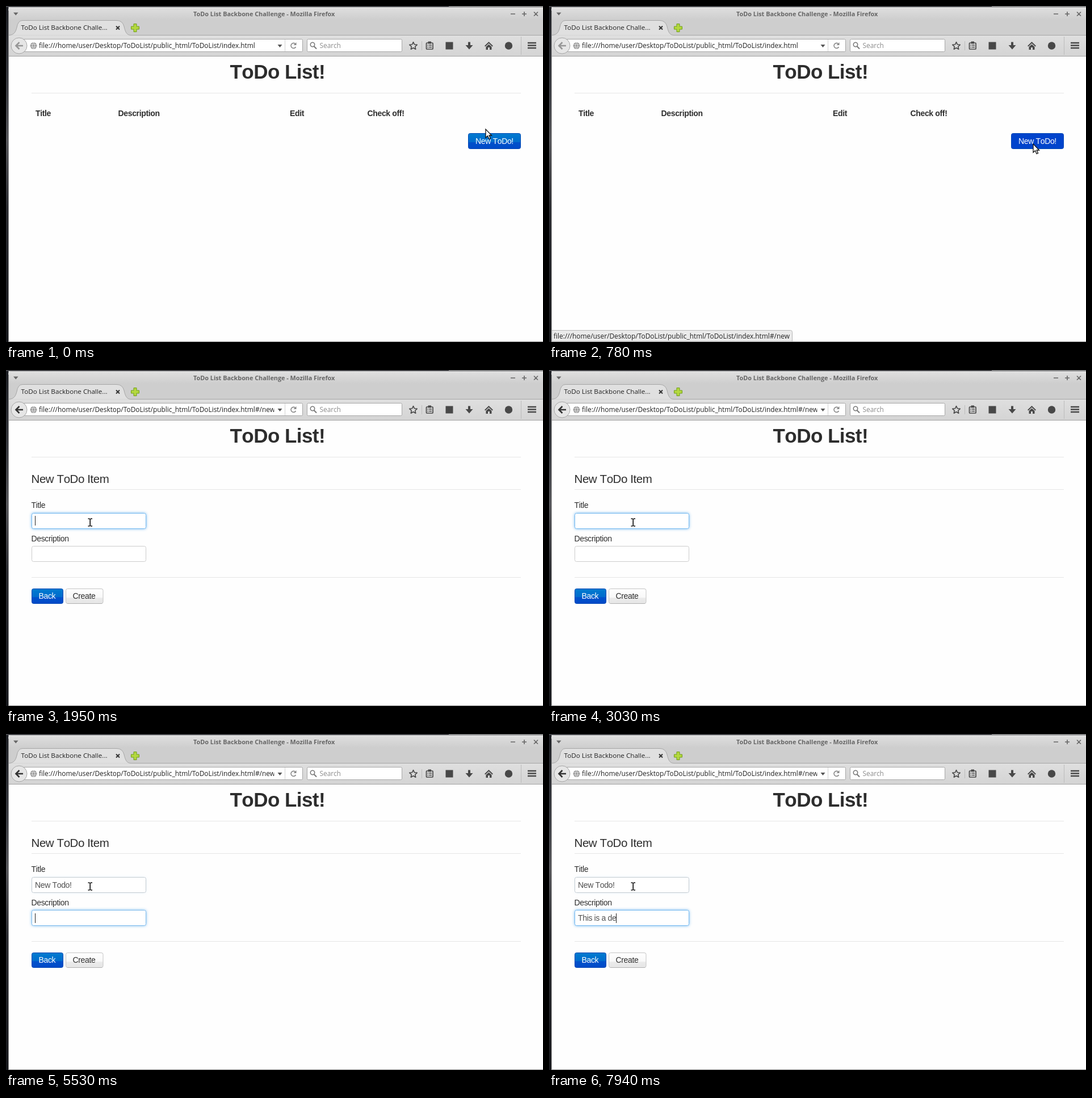
An HTML page for the animation above (8 s loop, 946x592 px).

```html
<!DOCTYPE html>
<html lang="en">
<head>
<meta charset="utf-8">
<title>ToDo List</title>
<style>
html, body { margin: 0; width: 100%; height: 100%; overflow: hidden; background: #fefefe; }
svg { display: block; }
text { font: 14px "Liberation Sans", Arial, sans-serif; letter-spacing: -.35px; font-kerning: none; white-space: pre; fill: #2d2d2d; }
.ui { font: 11.9px "Open Sans", "Noto Sans", sans-serif; letter-spacing: 0; fill: #222; }
.bold { font-weight: bold; }
.entry { fill: #505050; }
.white { fill: #fff; }
.rule { stroke: #e6e6e6; }
.icon { fill: none; stroke: #484848; stroke-width: 2; }
.solid { fill: #484848; }
.box { fill: #fff; stroke: #a6a6a6; }
.primary { fill: url(#blue); stroke: #0047b4; }
</style>
</head>
<body>
<svg width="946" height="592" viewBox="0 0 946 592">
  <defs>
    <linearGradient id="bar" x2="0" y2="1"><stop stop-color="#dfdfdf"/><stop offset="1" stop-color="#cecece"/></linearGradient>
    <linearGradient id="tools" x2="0" y2="1"><stop stop-color="#dfdfdf"/><stop offset="1" stop-color="#d4d4d4"/></linearGradient>
    <linearGradient id="blue" x2="0" y2="1">
      <stop stop-color="#007bcf"/><stop offset=".56" stop-color="#006ccd"/>
      <stop offset=".58" stop-color="#0052cb"/><stop offset="1" stop-color="#0049c8"/>
    </linearGradient>
    <linearGradient id="pale" x2="0" y2="1">
      <stop stop-color="#fff"/><stop offset=".6" stop-color="#f8f8f8"/>
      <stop offset=".62" stop-color="#ebebeb"/><stop offset="1" stop-color="#e6e6e6"/>
    </linearGradient>
    <linearGradient id="desk" x2="0" y2="1">
      <stop stop-color="#1b1d22"/><stop offset=".25" stop-color="#3a3c42"/><stop offset=".4" stop-color="#56565a"/>
      <stop offset=".6" stop-color="#2b2c31"/><stop offset="1" stop-color="#17181c"/>
    </linearGradient>
    <clipPath id="urlClip"><path d="M56 58H472.500V82H56z"/></clipPath>
  </defs>

  <!-- window frame -->
  <path d="M0 0H4.500V592H0z" fill="url(#desk)"/>
  <path d="M0 0H946V2H0z" fill="#45464a"/>
  <path d="M780 0H946V1H780z" fill="#b5b5b5"/>
  <path d="M4 8Q4 2 10 2H946V24H4z" fill="url(#bar)"/>
  <path d="M4 24H946V52H4z" fill="#cecece"/>
  <path d="M4 52H946V88H4z" fill="url(#tools)"/>
  <path d="M4 88.500H946" stroke="#a3a3a3"/>
  <path d="M4.500 8V592M4 591.500H946" stroke="#8b8b8b" fill="none"/>
  <path d="M13 11.500H21.500L17.250 16.500z" fill="#666"/>
  <path d="M889 14H897M909 14H917M913 10V18M930 10.500L937 17.500M937 10.500L930 17.500" stroke="#666" stroke-width="1.600"/>
  <text class="ui" x="330" y="18" style="font-weight:bold;font-size:10.85px;fill:#666">ToDo List Backbone Challenge - Mozilla Firefox</text>

  <!-- tab -->
  <path d="M5 51.500C14 51 17 46 19 38Q21 25.500 29 25.500H195Q205 25.500 208 36C210 46 213 51.500 220 51.500" fill="#e0e0e0"/>
  <path d="M5 51.500C14 51 17 46 19 38Q21 25.500 29 25.500H195Q205 25.500 208 36C210 46 213 51.500 220 51.500H946" fill="none" stroke="#a6a6a6"/>
  <text class="ui" x="26.500" y="42" style="font-size:11.65px">ToDo List Backbone Challe...</text>
  <path d="M194 35.500L200 41.500M200 35.500L194 41.500" stroke="#333" stroke-width="2"/>
  <path d="M225 31.500H230V36H234.500V41H230V45.500H225V41H220.500V36H225z" fill="#b4d83f" stroke="#6f9d17" stroke-linejoin="round"/>

  <!-- toolbar -->
  <rect class="box" x="23.500" y="58.500" width="499" height="22" rx="2"/>
  <circle cx="23" cy="70" r="14" fill="#e6e6e6" stroke="#a6a6a6"/>
  <path id="back" d="M30 70H18M23.500 64L17.500 70L23.500 76" fill="none" stroke-width="2.600"/>
  <circle cx="48.500" cy="70" r="6" fill="#999"/>
  <path d="M43 68H54M43 72H54M48.500 64Q44 70 48.500 76Q53 70 48.500 64" fill="none" stroke="#e4e4e4" stroke-width=".9"/>
  <g clip-path="url(#urlClip)"><text id="url" class="ui" x="58" y="74"></text></g>
  <path d="M478.500 68H486.500L482.500 73z" fill="#555"/>
  <path d="M491.500 59V80" stroke="#d0d0d0"/>
  <path d="M510.500 72A4.500 4.500 0 1 1 509.500 66.500" fill="none" stroke="#8a8a8a" stroke-width="1.600"/>
  <path d="M511.500 64V69H506.500z" fill="#8a8a8a"/>
  <rect class="box" x="530.500" y="58.500" width="167" height="22" rx="2"/>
  <circle cx="540" cy="68" r="3.700" fill="none" stroke="#777" stroke-width="1.600"/>
  <path d="M542.500 71L547 75.500" stroke="#777" stroke-width="2"/>
  <text class="ui" x="552.500" y="74" style="fill:#8b8b8b">Search</text>
  <path class="icon" style="stroke-width:1.600" stroke-linejoin="round" d="M717.500 63.500L719.500 67.800L724.200 68.300L720.700 71.500L721.700 76.200L717.500 73.800L713.300 76.200L714.300 71.500L710.800 68.300L715.500 67.800z"/>
  <path d="M732.500 62V78M907.500 54V86" stroke="#bcbcbc"/>
  <rect class="icon" style="stroke-width:1.700" x="740.500" y="65" width="11.500" height="11" rx="1"/>
  <path class="solid" d="M743.500 62.500H749V66.500H743.500z"/>
  <path class="icon" style="stroke-width:1.300" d="M742.500 69H744M745 69H750M742.500 72.500H744M745 72.500H750"/>
  <rect class="solid" x="774.500" y="63.500" width="13" height="13"/>
  <path class="solid" d="M814 63.500H818V69H822.500L816 76.500L809.500 69H814z"/>
  <path class="solid" d="M850.500 63L858 70.300L856.500 71.500L850.500 65.800L844.500 71.500L843 70.300zM850.500 67.500L855.500 72V77H852V73H849V77H845.500V72z"/>
  <circle class="solid" cx="885.500" cy="70" r="6.700"/>
  <path class="icon" style="stroke-width:2.500" d="M919 65H934M919 69.500H934M919 74H934"/>

  <!-- page -->
  <text x="394.500" y="128" style="font-weight:bold;font-size:35px;letter-spacing:-.55px">ToDo List!</text>
  <path class="rule" d="M45 153.500H907"/>

  <g id="list">
    <text class="bold" x="52" y="194">Title</text>
    <text class="bold" x="197.500" y="194">Description</text>
    <text class="bold" x="500" y="194">Edit</text>
    <text class="bold" x="636.500" y="194">Check off!</text>
    <rect id="newButton" class="primary" x="814.500" y="224.500" width="92" height="27" rx="3"/>
    <text class="white" x="827" y="243">New ToDo!</text>
  </g>

  <g id="form">
    <text x="44.500" y="199" style="font-size:20.5px;letter-spacing:-.42px">New ToDo Item</text>
    <path class="rule" d="M45 210.500H907M45 365.500H907"/>
    <text x="44.500" y="243">Title</text>
    <text x="44.500" y="301.500">Description</text>
    <rect class="field" x="45.500" y="252.500" width="201" height="27" rx="3" fill="#fff"/>
    <rect class="field" x="45.500" y="310.500" width="201" height="27" rx="3" fill="#fff"/>
    <text class="entry" x="51" y="270.500"></text>
    <text class="entry" x="51" y="329"></text>
    <path id="caret" stroke="#222"/>
    <rect class="primary" x="45.500" y="385.500" width="55" height="26" rx="3"/>
    <text class="white" x="57.500" y="403">Back</text>
    <rect x="105.500" y="385.500" width="65.500" height="26" rx="3" fill="url(#pale)" stroke="#c4c4c4"/>
    <path d="M108 411.500H169" stroke="#b0b0b0"/>
    <text x="117.500" y="403">Create</text>
  </g>

  <g id="status">
    <path d="M5 571.500H425.500Q428.500 571.500 428.500 574.500V591H5z" fill="#ebebeb" stroke="#b8b8b8"/>
    <text class="ui" x="8" y="585.500">file:///home/user/Desktop/ToDoList/public_html/ToDoList/index.html#/new</text>
  </g>

  <path id="arrow" d="M.5 .5V15.500L4 12.300L6.500 18L9 17L6.600 11.500H11z" fill="#fff" stroke="#111" stroke-width="1.300"/>
  <g id="beam">
    <path d="M144.500 262.500H151.500M148 262.500V274.500M144.500 274.500H151.500" stroke="#fff" stroke-width="4"/>
    <path d="M144.500 262H147.500M149 262H152M148.200 262V275M144.500 275H147.500M149 275H152" stroke="#111" stroke-width="1.700"/>
  </g>
</svg>
<script>
const LOOP = 8000;
const $ = id => document.getElementById(id);
const fields = document.querySelectorAll(".field");
const entries = document.querySelectorAll(".entry");
const page = "file:///home/user/Desktop/ToDoList/public_html/ToDoList/index.html";

// Each track is a list of [start time, value]; a value holds until the next.
const pointer = [[0, [844.5, 216.5]], [150, [848, 227]], [270, [851, 237]], [390, [852.5, 242.5]],
  [1050, [770, 238]], [1170, [510, 222]], [1290, [256.5, 205.5]], [1440, [196, 230]], [1560, [148, 247]]];
const buttonFill = [[0, "url(#blue)"], [150, "#0050cb"], [270, "#0044cc"], [540, "#003cb5"], [780, "#0044cc"]];
const statusAlpha = [[0, 0], [270, 1], [900, .3], [1050, 0]];
const titleGlow = [[0, 0], [1710, .3], [1830, .7], [1950, 1], [5530, .12]];
const noteGlow = [[0, 0], [5530, .9], [6350, 1]];
const titleKeys = [[0, 0], [3190, 1], [3750, 3], [3890, 4], [4150, 5], [4420, 6], [4540, 7], [4660, 8], [4940, 9]];
const noteKeys = [[0, 0], [6350, 1], [6620, 2], [6740, 4], [6870, 5], [7010, 6], [7130, 7], [7250, 8],
  [7410, 9], [7660, 10], [7780, 11], [7940, 12]];
const caretOn = [[0, false], [1950, true], [3030, false], [3190, true]];

const at = (track, t) => track.findLast(([start]) => start <= t)[1];
const show = (id, on) => $(id).style.display = on ? "" : "none";

function setGlow(field, k) {
  const mix = (a, b) => Math.round(a + (b - a) * k);
  field.style.stroke = `rgb(${mix(204, 117)},${mix(204, 185)},${mix(204, 240)})`;
  field.style.filter = k ? `drop-shadow(0 0 2.5px rgba(82,168,236,${.8 * k}))` : "none";
}

function draw(t) {
  const onForm = t >= 900, onField = t >= 1710;
  show("list", !onForm);
  show("form", onForm);
  show("arrow", !onField);
  show("beam", onField);
  $("back").style.stroke = onForm ? "#333" : "#979797";
  $("url").textContent = page + (onForm ? "#/new" : "");
  $("newButton").style.fill = at(buttonFill, t);
  $("status").style.opacity = at(statusAlpha, t);
  $("arrow").setAttribute("transform", `translate(${at(pointer, t)})`);

  setGlow(fields[0], at(titleGlow, t));
  setGlow(fields[1], at(noteGlow, t));
  entries[0].textContent = "New Todo!".slice(0, at(titleKeys, t));
  entries[1].textContent = "This is a de".slice(0, at(noteKeys, t));

  show("caret", at(caretOn, t));
  const active = t < 5380 ? 0 : 1;
  const x = 51.5 + Math.round(entries[active].getComputedTextLength());
  $("caret").setAttribute("d", `M${x} ${active ? 316 : 257}v17`);
}

const begin = performance.now();
function tick() {
  draw((performance.now() - begin) % LOOP);
  requestAnimationFrame(tick);
}
tick();
</script>
</body>
</html>
```
